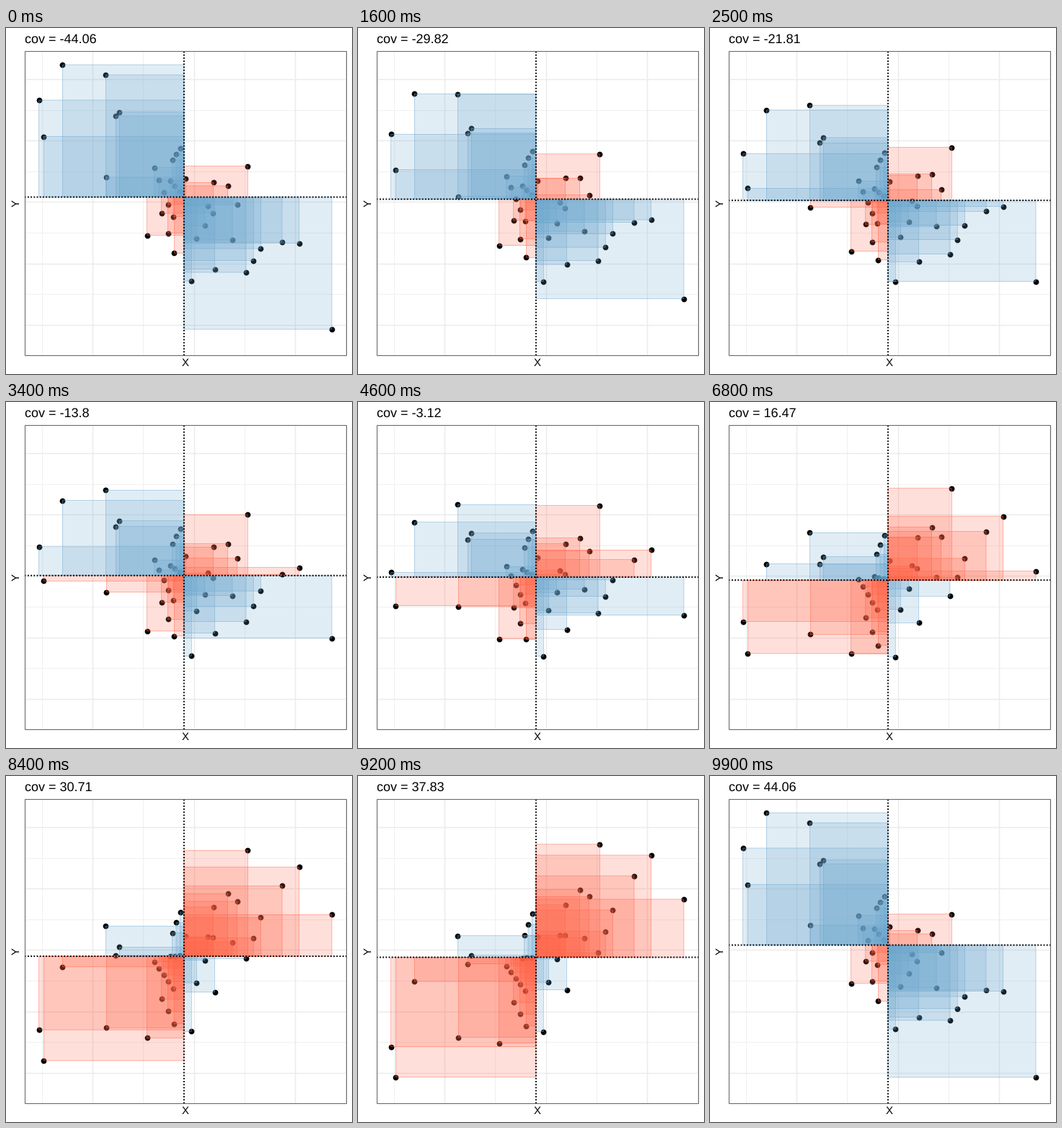
A matplotlib script for the animation above (10000 ms loop, 480 px wide and 480 px high).

```python
import numpy as np
import matplotlib.pyplot as plt
from matplotlib.animation import FuncAnimation
from matplotlib.patches import Rectangle

plt.rcParams["font.family"] = "Liberation Sans"
plt.rcParams["text.hinting"] = "none"

SIZE, DPI = 480, 72          # at 72 dpi one point is one pixel
FRAMES, INTERVAL = 100, 100
LEFT, TOP, RIGHT, BOTTOM = 25.8, 32.3, 472.4, 454.3
BLUE, RED = "#6ca6cd", "#ff6347"
COV = 44.06
TILT, DRIFT = 0.01384, 0.182  # per-state change of slope and of the mean


def run(start, end, n=3):
    """Evenly spaced points from start to end."""
    return np.linspace(start, end, n)


# starting positions in pixels: outlying points, then short runs
points = np.vstack([
    [(78.3, 51), (138.4, 65), (45.8, 100), (52.3, 150.5), (139.2, 207)],
    [(195.5, 287.5), (249.2, 209.3), (287.6, 214.3), (320.5, 245)],
    [(257.2, 351), (289.5, 334.5), (314, 294), (383, 297), (406.6, 298.5)],
    [(452, 418)],
    run((152.3, 122), (157.4, 116.5), 2),
    run((205.5, 193.5), (232, 261.5), 5),
    run((228.2, 212), (240.7, 226.7)),
    run((215.7, 257), (233.4, 312.3)),
    run((230.5, 183), (241.5, 167)),
    run((264.3, 291.8), (287.3, 256.5)),
    run((335.2, 191.5), (280, 246.5)),
    run((333, 339), (353.3, 306)),
])
xs, ys = points.T
mx = xs.mean()

fig = plt.figure(figsize=(SIZE / DPI, SIZE / DPI), dpi=DPI, facecolor="white")
ax = fig.add_axes([0, 0, 1, 1])
ax.set(xlim=(0, SIZE), ylim=(SIZE, 0))
ax.axis("off")


def grid(x0, cols, y0, rows, width):
    style = dict(color="#ebebeb", lw=width, zorder=1)
    ax.vlines(x0 + 140.6 * np.arange(cols), TOP, BOTTOM, **style)
    ax.hlines(y0 + 85.1 * np.arange(rows), LEFT, RIGHT, **style)


def dotted(x, y):
    return ax.plot(x, y, color="black", lw=2, ls=(0, (0.9, 1.2)),
                   dash_capstyle="butt", zorder=5, snap=False)[0]


grid(49.7, 4, 113.8, 4, 0.73)
grid(120, 3, 71.2, 5, 1.45)

dots = ax.scatter(xs, ys, s=7.8 ** 2, color="black", lw=0, zorder=2, snap=False)
boxes = [ax.add_patch(Rectangle((0, 0), 1, 1, lw=0.45, zorder=3, snap=False))
         for _ in xs]
dotted([mx, mx], [BOTTOM, TOP])
mean_line = dotted([LEFT, RIGHT], [0, 0])
ax.add_patch(Rectangle((LEFT, TOP), RIGHT - LEFT, BOTTOM - TOP, fill=False,
                       ec="#6a6a6a", lw=1.1, zorder=6))

title = ax.text(25.8, 20.6, "", size=18, va="baseline")
ax.text(249.1, 469, "X", size=15, ha="center", va="baseline")
ax.text(18.2, 243.3, "Y", size=15, ha="center", va="baseline",
        rotation=90, rotation_mode="anchor")


def update(i):
    progress = i / (FRAMES - 1)
    state = round(FRAMES * progress) % FRAMES  # wraps to the start at the end
    y = ys + state * (DRIFT - TILT * (xs - mx))
    my = y.mean()
    dots.set_offsets(np.column_stack([xs, y]))
    mean_line.set_ydata([my, my])
    for box, dx, dy in zip(boxes, xs - mx, y - my):
        color = BLUE if dx * dy > 0 else RED
        box.set_bounds(mx, my, dx, dy)
        box.set_facecolor((color, 0.2))
        box.set_edgecolor(color)
    cov = COV * (2 * progress - 1)
    title.set_text(f"cov = {round(cov, 2):g}")
    return [dots, mean_line, title, *boxes]


anim = FuncAnimation(fig, update, frames=FRAMES, interval=INTERVAL,
                     repeat=True, repeat_delay=0, blit=False)
plt.show()
```
